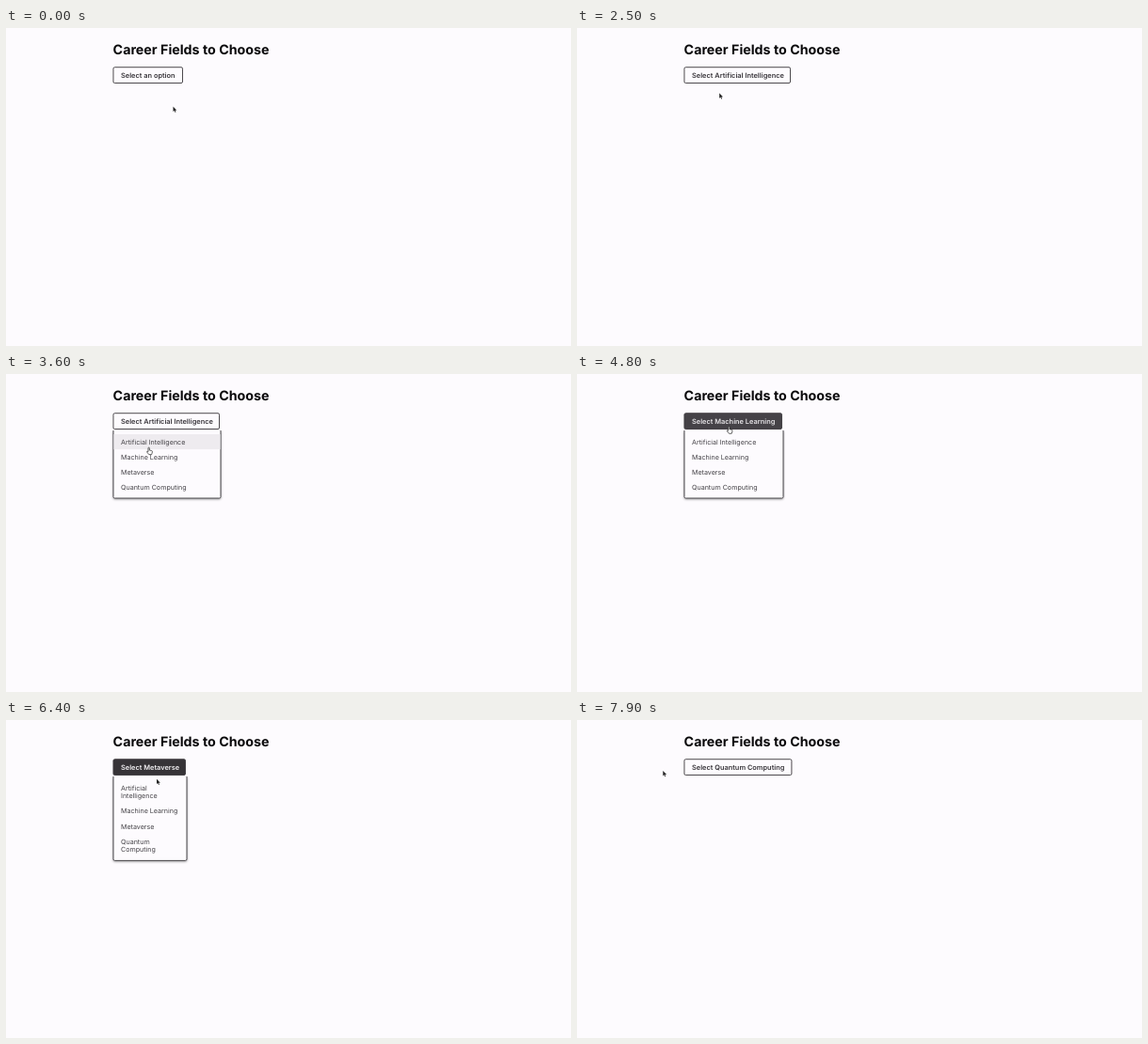
An HTML page for the animation above (8000 ms loop, 600x338 px).

```html
<!DOCTYPE html>
<html lang="en">
<head>
<meta charset="utf-8">
<title>Career Fields to Choose</title>
<style>
  html, body { margin: 0; width: 100%; height: 100%; overflow: hidden; background: #fdfbfe; }
  svg { display: block; width: 600px; height: 338px; }
  text { font-family: Inter, sans-serif; text-rendering: geometricPrecision; }
  .title { font-size: 14.25px; font-weight: 700; fill: #09080a; }
  .label { font-size: 7.4px; font-weight: 600; }
  .item { font-size: 7.14px; fill: #434045; }
  .outline { stroke: #3f3c41; stroke-width: .94; }
  .panel { fill: #fdfbfe; filter: drop-shadow(0 1px .8px rgba(0, 0, 0, .35)); }
  .active { fill: #eeebef; }
</style>
</head>
<body>
<svg viewBox="0 0 600 338">
  <text class="title" x="113.6" y="28">Career Fields to Choose</text>
  <g id="dropdown"></g>
  <path id="arrow" d="M0 0V5.4L1.2 4.3 2.1 6.3 2.9 5.9 2.1 4H3.8Z" fill="#222"/>
  <path id="hand" d="M-.6 4.5V.6a.65.65 0 0 1 1.3 0V2.9l2.3.5q.9.2.8 1.1L3.4 6.3 3 7.5H.2L-1.8 5q-.4-.9.4-.9Z" fill="#fff" stroke="#222" stroke-width=".7"/>
</svg>
<script>
const LOOP = 8000, STEP = 100, APPROACH = 400, FADE = 200;
const DARK = [43, 40, 45], INK = [58, 55, 60], LIGHT = [253, 251, 254];
const BUTTON = { left: 113.5, top: 41.25, bottom: 59 };
const TEXT_LEFT = 122, ITEMS_TOP = 64, ITEM_PAD = 7.4, LINE = 8.7, CHAR = 3.8;
const HOME = { x: 177.5, y: 83.5 }, PRESS = { x: 162, y: 53 }, EXIT = { x: 91.3, y: 54 };
const FIELDS = ['Artificial Intelligence', 'Machine Learning', 'Metaverse', 'Quantum Computing'];

// A visit: press the button, leave it, settle on an item, pick that item.
const visits = [
  { label: 'Select an option', right: 188, press: 600, leave: 1700, settle: 2200, pick: 2500, x: 151.2, y: 69.3 },
  { label: 'Select ' + FIELDS[0], right: 227, press: 3200, leave: 3200, settle: 3850, pick: 4100, x: 146.5, y: 90.5 },
  { label: 'Select ' + FIELDS[1], right: 218, press: 4600, leave: 4675, settle: 5550, pick: 5600, x: 148, y: 103 },
  { label: 'Select ' + FIELDS[2], right: 191, press: 6200, leave: 6290, settle: 6790, pick: 7400, x: 146, y: 131 },
];
const finished = { label: 'Select ' + FIELDS[3], right: 228.4, press: Infinity };

const moves = visits.flatMap(v => [
  { from: v.press - APPROACH, until: v.press, to: PRESS },
  { from: v.leave, until: v.settle, to: v },
]).concat({ from: 7700, until: 7900, to: EXIT });

const byId = id => document.getElementById(id);
const clamp = v => Math.max(0, Math.min(1, v));
const ramp = (t, from, until) => clamp((t - from) / (until - from));
const smooth = k => k * k * (3 - 2 * k);
const lerp = (a, b, k) => a + (b - a) * k;
const mix = (a, b, k) => `rgb(${a.map((v, i) => Math.round(lerp(v, b[i], k)))})`;

const pointerAt = t => moves.reduce((p, { from, until, to }) => {
  const k = smooth(ramp(t, from, until));
  return { x: lerp(p.x, to.x, k), y: lerp(p.y, to.y, k) };
}, HOME);

// The button darkens as the pointer arrives and clears shortly after it leaves.
const hoverAt = t => Math.max(...visits.map(({ press, leave }) =>
  ramp(t, press - FADE, press) - ramp(t, leave + STEP, leave + STEP + FADE)));

function layout(right) {
  const room = right - TEXT_LEFT - 6;
  let top = ITEMS_TOP;
  return FIELDS.map(name => {
    const lines = name.length * CHAR > room ? name.split(' ') : [name];
    const row = { lines, top, bottom: top + ITEM_PAD + lines.length * LINE };
    top = row.bottom;
    return row;
  });
}

function buttonMarkup({ label, right }, hover) {
  const { left, top, bottom } = BUTTON;
  return `<rect class="outline" x="${left + .47}" y="${top + .47}" width="${right - left - .94}"
      height="${bottom - top - .94}" rx="1.5" fill="${mix(LIGHT, DARK, hover)}"/>
    <text class="label" x="${TEXT_LEFT}" y="52.7" fill="${mix(INK, LIGHT, hover)}">${label}</text>`;
}

function menuMarkup(right, rows, active) {
  const left = BUTTON.left + .5, edge = right + 1, top = 60;
  const bottom = rows[rows.length - 1].bottom + 3.6;
  const panel = `<path class="panel outline"
    d="M${left} ${top}V${bottom - 1.5}q0 1.5 1.5 1.5H${edge - 1.5}q1.5 0 1.5 -1.5V${top}"/>`;
  const mark = active ? `<rect class="active" x="${left + .5}" y="${active.top}"
    width="${edge - left - 1}" height="${active.bottom - active.top}"/>` : '';
  const texts = rows.flatMap(row => row.lines.map((line, i) =>
    `<text class="item" x="${TEXT_LEFT}" y="${row.top + 10.65 + i * LINE}">${line}</text>`));
  return panel + mark + texts.join('');
}

function draw(t) {
  const visit = visits.find(v => t < v.pick) || finished;
  const { x, y } = pointerAt(t);
  const inside = x > BUTTON.left && x < visit.right;
  const onButton = inside && y > BUTTON.top && y < BUTTON.bottom;
  const rows = t >= visit.press ? layout(visit.right) : [];
  const active = rows.find(row => inside && y >= row.top && y < row.bottom);

  byId('dropdown').innerHTML = buttonMarkup(visit, hoverAt(t)) +
    (rows.length ? menuMarkup(visit.right, rows, active) : '');

  const shape = onButton || active ? 'hand' : 'arrow';
  for (const id of ['hand', 'arrow']) {
    byId(id).setAttribute('transform', `translate(${x} ${y})`);
    byId(id).setAttribute('visibility', id === shape ? 'visible' : 'hidden');
  }
}

let drawn = -1;
const begin = performance.now();
function frame() {
  const t = Math.floor((performance.now() - begin) % LOOP / STEP) * STEP;
  if (t !== drawn) draw(drawn = t);
  requestAnimationFrame(frame);
}
frame();
</script>
</body>
</html>
```
